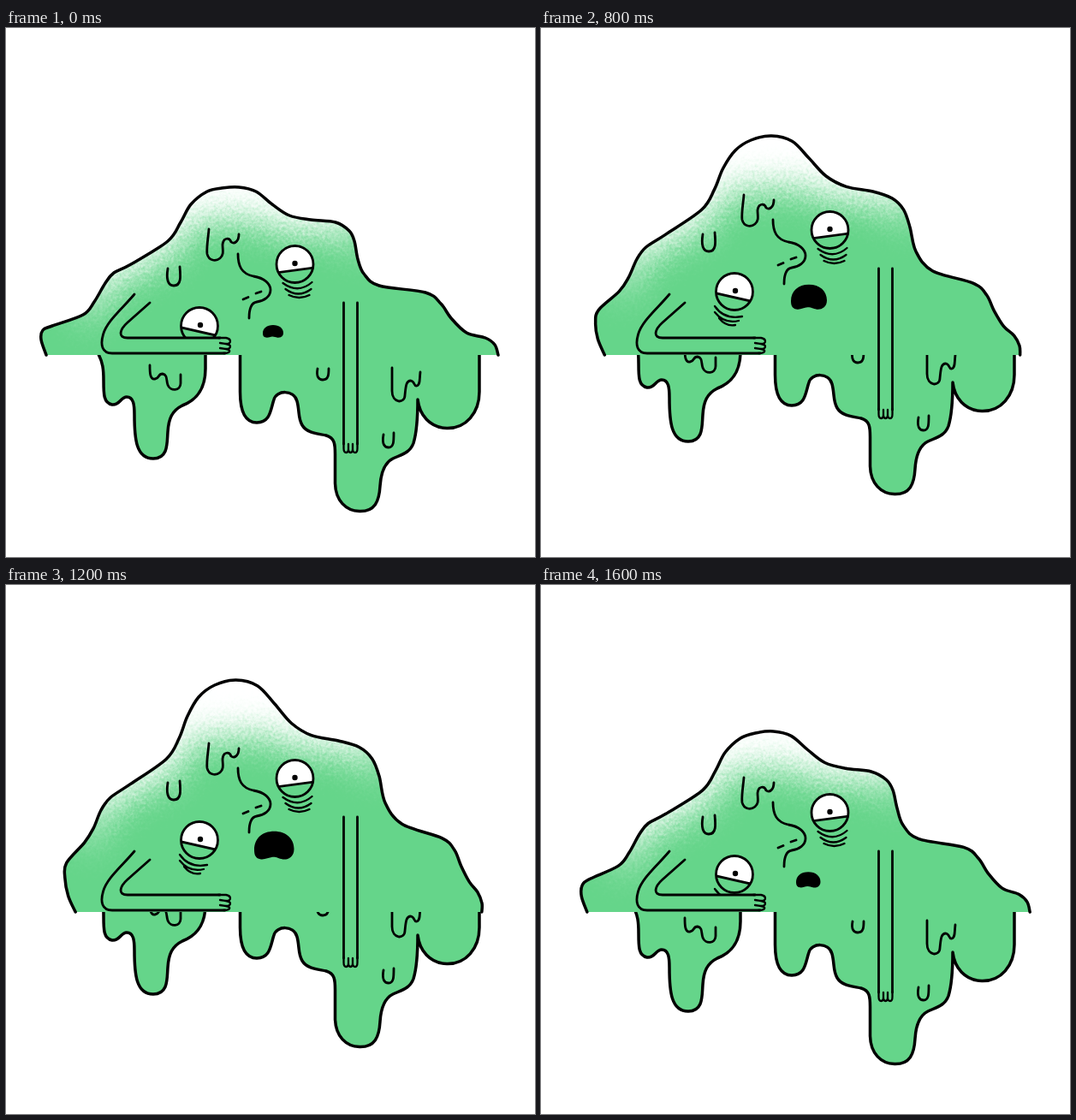
Write an HTML page that moves like this. It is 618 px wide and 618 px high and loops after 1.7 s.

```html
<!DOCTYPE html>
<html lang="en">
<head>
<meta charset="utf-8">
<title>Melting blob</title>
<style>
  html, body { margin: 0; width: 100%; height: 100%; overflow: hidden; background: #fff; }
  svg { display: block; width: 618px; height: 618px; }
  .line { fill: none; stroke: #000; stroke-width: 2.8; stroke-linecap: round; stroke-linejoin: round; }
  .edge { stroke-width: 3.5; }
  .thin { stroke-width: 2.3; }
  .skin { fill: #65d58a; }
</style>
</head>
<body>
<svg viewBox="0 0 618 618">
  <defs>
    <filter id="spray" filterUnits="userSpaceOnUse" x="0" y="0" width="618" height="618" color-interpolation-filters="sRGB">
      <feGaussianBlur stdDeviation="21" result="soft"/>
      <feTurbulence type="fractalNoise" baseFrequency=".3" numOctaves="3" seed="4" result="noise"/>
      <feDisplacementMap in="soft" in2="noise" scale="30" xChannelSelector="R" yChannelSelector="G"/>
    </filter>
    <clipPath id="below"><rect y="381" width="618" height="237"/></clipPath>
    <clipPath id="above"><rect width="618" height="376"/></clipPath>
    <clipPath id="inside"><path class="body"/></clipPath>
    <clipPath id="ball"><circle r="21.5"/></clipPath>
    <g id="eye">
      <circle r="21.5" fill="#fff"/>
      <circle cy="-1" r="3.2"/>
    </g>
  </defs>

  <g clip-path="url(#below)">
    <g id="drips">
      <path class="line edge skin" d="M108 381C113 391 114 398 114 412C114 428 114 438 124 440C133 441 134 431 141 431C149 431 150 440 150 452C150 480 152 503 172 503C190 503 188 484 189 472C190 456 194 447 206 441C219 436 233 426 233 398V381"/>
      <path class="line edge skin" d="M273.5 381V425C273.5 450 281 461 293 461C309 461 309 446 313 434C316 423 336 422 340 436C343 447 341 456 346 464C352 474 366 474 374 476C384 479 384.5 486 384.5 498V532C385 552 397 564 413 564.5C431 565 436 553 437 535C438 519 442 508 452 503C463 498 472 496 476 485C480 472 481 455 481 434C483 452 495 467 515 467.5C537 468 553 450 553 425V381"/>
      <path class="line" d="M168 394C168 402 168 411 174 410C180 409 177 404 183 404C189 405 187 412 189 417C192 425 204 424 204 415V405"/>
      <path class="line" d="M451 397V424C451 439 466 439 466 429C467 420 467 412 473 412C478 413 476 419 480 418C484 417 483 410 484 402"/>
      <path class="line" d="M364 398C362 408 366 411 370 411C377 411 377 404 377 398M441 475C439 486 442 490 447 490C453 490 453 483 453 473"/>
    </g>
  </g>

  <path class="body skin"/>
  <g clip-path="url(#inside)"><path id="shine" fill="#fff" filter="url(#spray)"/></g>
  <path class="body line edge"/>

  <g clip-path="url(#above)">
    <g id="face">
      <path class="line" d="M237 235C236 247 234 257 235 264C237 272 245 273 250 269C255 265 253 259 253 253C254 245 261 244 263 250C267 253 272 249 272 241"/>
      <path class="line" d="M189 281C187 293 189 301 196 301C205 301 204 290 203 279"/>
      <path class="line" d="M271 264C271 278 275 287 289 290C302 292 309 299 309 306C309 314 301 319 293 320C286 321 284 329 284 339M277 317L283 314.5M292 310L298 308"/>
      <g transform="translate(337.5 276)">
        <use href="#eye"/>
        <path class="line skin" clip-path="url(#ball)" d="M-22 10L23 4V30H-22Z"/>
        <circle class="line" r="21.5"/>
        <path class="line thin" d="M-14 22Q4 35 20 21M-11 29Q4 40 19 29M-7 36Q5 42 17 36"/>
      </g>
      <g transform="translate(226 348)">
        <use href="#eye" x="1"/>
        <path class="line skin" clip-path="url(#ball)" d="M-23 1.5L23 12V30H-23Z"/>
        <circle class="line" r="21.5"/>
        <path class="line thin" d="M-23 17Q-12 33 9 29M-23 24Q-12 38 5 34M-18 31Q-10 41 1 39"/>
      </g>
    </g>
    <path id="mouth" d="M0 .65C0 .25 .2 0 .5 0C.8 0 1 .25 1 .62C1 .9 .85 1 .72 .98C.6 .95 .56 .89 .46 .9C.36 .92 .25 1 .15 .97C.05 .95 0 .85 0 .65Z"/>
  </g>

  <path class="skin" d="M128 362H259V380H128Z"/>
  <path class="line" d="M150 311C136 328 118 342 113.5 358C110 370 112 380 124 380H256M168 321L142 344C133 352 130 362 142 362H250"/>
  <path class="line thin" d="M248 362H257Q262 363 262 366Q262 369 257 369L250 368M257 369Q262 370 262 372Q262 375 257 375L250 374M257 375Q262 376 261 378Q260 380 254 380"/>

  <g id="arm">
    <path class="skin" d="M394.5 322V492L402 496L410.5 492V322Z"/>
    <path class="line" d="M394.5 321V486M410.5 321V486"/>
    <path class="line thin" d="M394.5 485V491Q394.5 496 397.5 496Q400 496 400 492V486M400 492Q400 496 402.5 496Q405 496 405 492V486M405 492Q405 496 408 496Q410.5 496 410.5 491V485"/>
  </g>
</svg>
<script>
const $ = id => document.getElementById(id);
const parse = text => text.split(' ').map(pair => pair.split(',').map(Number));

// The body outline morphs between these two key poses.
const slumped = parse('47,382 41,364 43,353 54,348 90,335 103,320 116,298 126,286 146,276 189,249 204,227 216,206 235,191 252,187 272,186 292,191 311,206 331,219 356,224 385,227 401,237 407,249 411,270 418,287 436,301 490,309 508,322 520,339 538,356 560,362 571,370 575,382');
const raised = parse('88,382 79,363 74,340 74,320 92,294 102,277 110,256 121,241 145,224 187,194 202,169 211,143 223,119 242,103 268,96 294,103 314,125 334,150 357,166 389,173 415,180 432,194 441,214 448,248 468,275 513,293 527,307 534,326 542,345 549,358 553,372 552,382');

const STEPS = 6;
const mix = (a, b, t) => a + (b - a) * t;
const morph = t => slumped.map((p, i) => p.map((v, k) => mix(v, raised[i][k], t)));

// Smooth line through points (Catmull-Rom as cubic segments).
function curve(pts) {
  let d = 'M' + pts[0];
  for (let i = 0; i < pts.length - 1; i++) {
    const [p, a, b, q] = [pts[i - 1] || pts[i], pts[i], pts[i + 1], pts[i + 2] || pts[i + 1]];
    const c1 = a.map((v, k) => v + (b[k] - p[k]) / 6);
    const c2 = b.map((v, k) => v - (q[k] - a[k]) / 6);
    d += `C${c1} ${c2} ${b}`;
  }
  return d;
}

// White spray band: follows the outline and reaches deepest under the crown.
function shinePath(pts, t) {
  const rim = pts.slice(4, 23);
  const depth = mix(28, 64, t);
  const inner = rim.map(([x, y]) => [x, y + 11 + depth * Math.exp(-(((x - 265) / 60) ** 2))]);
  const outer = rim.map(([x, y]) => [x, y - 90]).reverse();
  return `${curve(inner)}L${outer.join(' ')}Z`;
}

const bodies = document.querySelectorAll('.body');

function draw(step) {
  const t = step / STEPS;
  const pts = morph(t);
  const d = curve(pts);
  bodies.forEach(el => el.setAttribute('d', d));
  $('shine').setAttribute('d', shinePath(pts, t));

  const lift = (id, height) => $(id).setAttribute('transform', `translate(0 ${-height * t})`);
  lift('drips', 30);
  lift('face', 60);
  lift('arm', 60);

  const [x, y, w, h] = [mix(300, 288, t), mix(347, 276, t), mix(24, 51, t), mix(15, 37, t)];
  $('mouth').setAttribute('transform', `translate(${x} ${y}) scale(${w} ${h})`);
}

// Rest low, climb, hold, sink: one step each 100 ms.
function stepAt(ms) {
  const up = Math.floor((ms - 400) / 100);
  const down = Math.floor((1799 - ms) / 100);
  return Math.max(0, Math.min(up, down, STEPS));
}

let shown = -1;
const began = performance.now();
function tick() {
  const step = stepAt(Math.floor((performance.now() - began) % 1700));
  if (step !== shown) draw(shown = step);
  requestAnimationFrame(tick);
}
tick();
</script>
</body>
</html>
```
